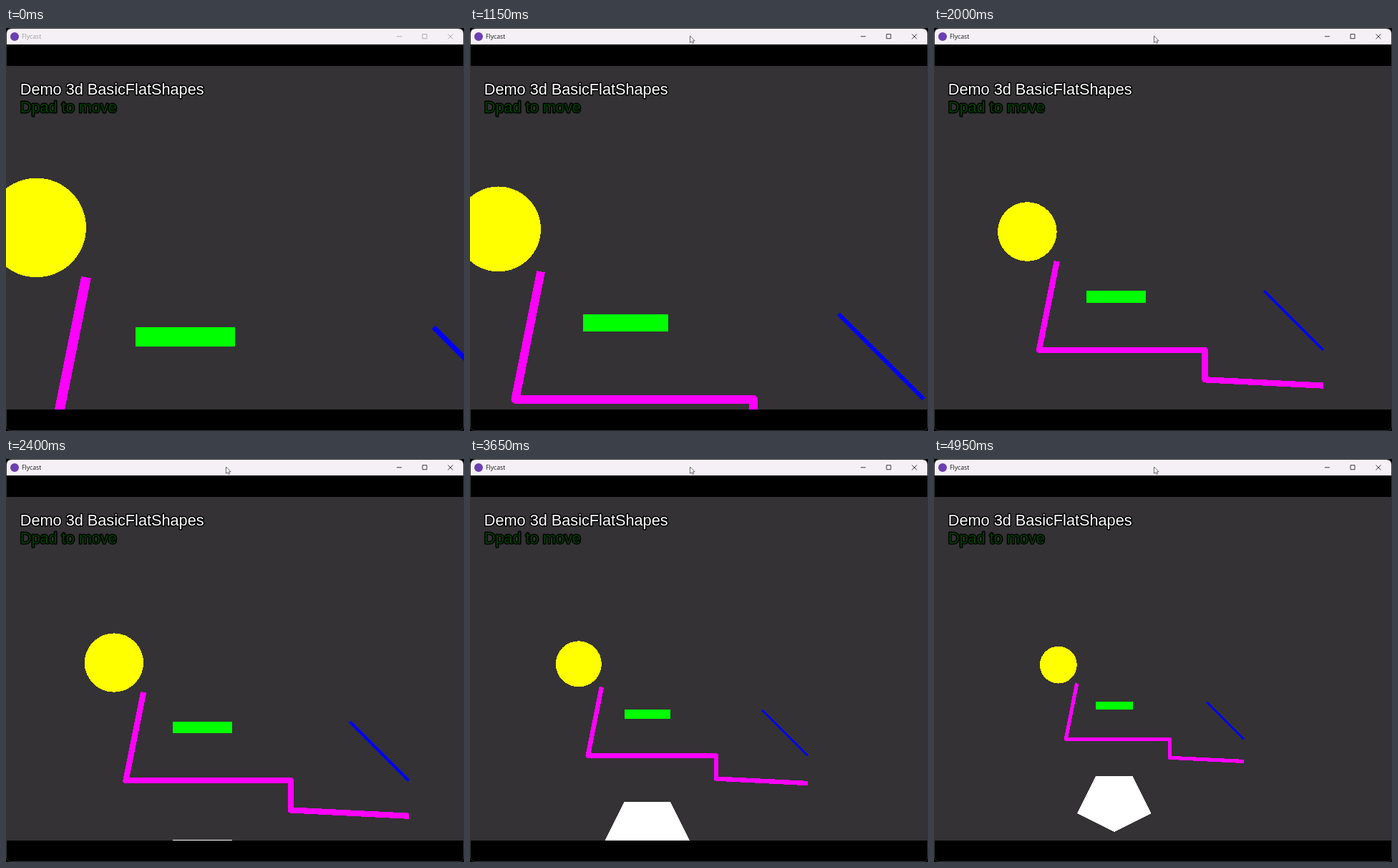
An HTML page for the animation above (5 s loop, 640 by 563 pixels).

```html
<!DOCTYPE html>
<html lang="en">
<head>
<meta charset="utf-8">
<title>Flat shapes demo</title>
<style>
  html, body { margin: 0; width: 100%; height: 100%; overflow: hidden; background: #000; }
  svg { display: block; }
  .caption { font: 8.7px "Open Sans", "Noto Sans", sans-serif; }
  .hud { font: 21.7px "Liberation Sans", Arial, sans-serif; stroke: #000; stroke-width: 3; stroke-linejoin: round; paint-order: stroke; }
</style>
</head>
<body>
<svg width="640" height="563" viewBox="0 0 640 563">
  <rect y="53" width="640" height="480" fill="#343235"/>

  <!-- Shapes in units of the circle's radius; y = 0 is the horizon -->
  <g id="world" shape-rendering="crispEdges">
    <circle cy="-.2" r="1" fill="#ff0"/>
    <rect x="2" y="1.8" width="2" height=".4" fill="#0f0"/>
    <path d="M8 1.8L10 3.8" stroke="#00f" stroke-width=".1"/>
    <path d="M1 .8L.4 3.8H6V4.8L10 5" fill="none" stroke="#f0f" stroke-width=".2" stroke-linejoin="round"/>
    <path d="M2 5.8H4L5 7.8L3 8.8L1 7.8Z" fill="#fff"/>
  </g>

  <g class="hud">
    <text x="19.8" y="92.6" fill="#fff">Demo 3d BasicFlatShapes</text>
    <text x="19.8" y="117.6" fill="#004000">Dpad to move</text>
  </g>

  <path d="M0 533H640V563H0Z"/>
  <path d="M.5 53V8Q.5 .5 8 .5H632Q639.5 .5 639.5 8V53M.5 533V555Q.5 562.5 8 562.5H632Q639.5 562.5 639.5 555V533" fill="none" stroke="#343235"/>
  <path d="M1 23V8Q1 1 8 1H632Q639 1 639 8V23Z" fill="#f4f0f5"/>
  <circle cx="12" cy="12" r="6" fill="#6a3fb0"/>
  <g id="titlebar">
    <text class="caption" x="22" y="15.3">Flycast</text>
    <path d="M546 11.8H553M582 8.7H588V14.7H582ZM617.5 8.5L624.5 15.3M624.5 8.5L617.5 15.3" fill="none" stroke="currentColor" stroke-width=".85"/>
  </g>
  <path id="cursor" d="M307.5 11V20.5L309.7 18.5L311.2 21.6L312.7 20.9L311.3 17.9H314.2Z" fill="#fff" stroke="#444" stroke-width=".8"/>
</svg>
<script>
  const LOOP = 5000, TICK = 50, SPEED = 0.06;
  const [world, titlebar, cursor] = ["world", "titlebar", "cursor"].map(id => document.getElementById(id));

  // Held directions: [from ms, to ms, sign]
  const strafe = [[552, 1520, -1], [1520, 2549, 1], [2549, 4462, -1], [4462, 4950, 1]];
  const retreat = [[872, 2012, 1], [2850, 4500, 1]];

  const travel = (moves, t) => moves.reduce((sum, [from, to, sign]) =>
    sum + sign * SPEED * Math.max(0, Math.min(t, to) - from), 0);

  function draw(t) {
    // The first step only shows once the picture starts changing
    const now = t < 600 ? 0 : t;
    const scale = 6935 / (100 + travel(retreat, now));
    const x = 320 + scale * (-200 + travel(strafe, now)) / 50;
    world.setAttribute("transform", `translate(${x} 292.8) scale(${scale})`);

    const color = t < 150 ? "#a09da2" : "#1c1b1d";
    titlebar.setAttribute("fill", color);
    titlebar.setAttribute("color", color);
    cursor.setAttribute("visibility", t < 300 ? "hidden" : "visible");
  }

  const start = performance.now();
  function frame() {
    const t = (performance.now() - start) % LOOP;
    draw(Math.floor(t / TICK) * TICK);
    requestAnimationFrame(frame);
  }
  frame();
</script>
</body>
</html>
```
